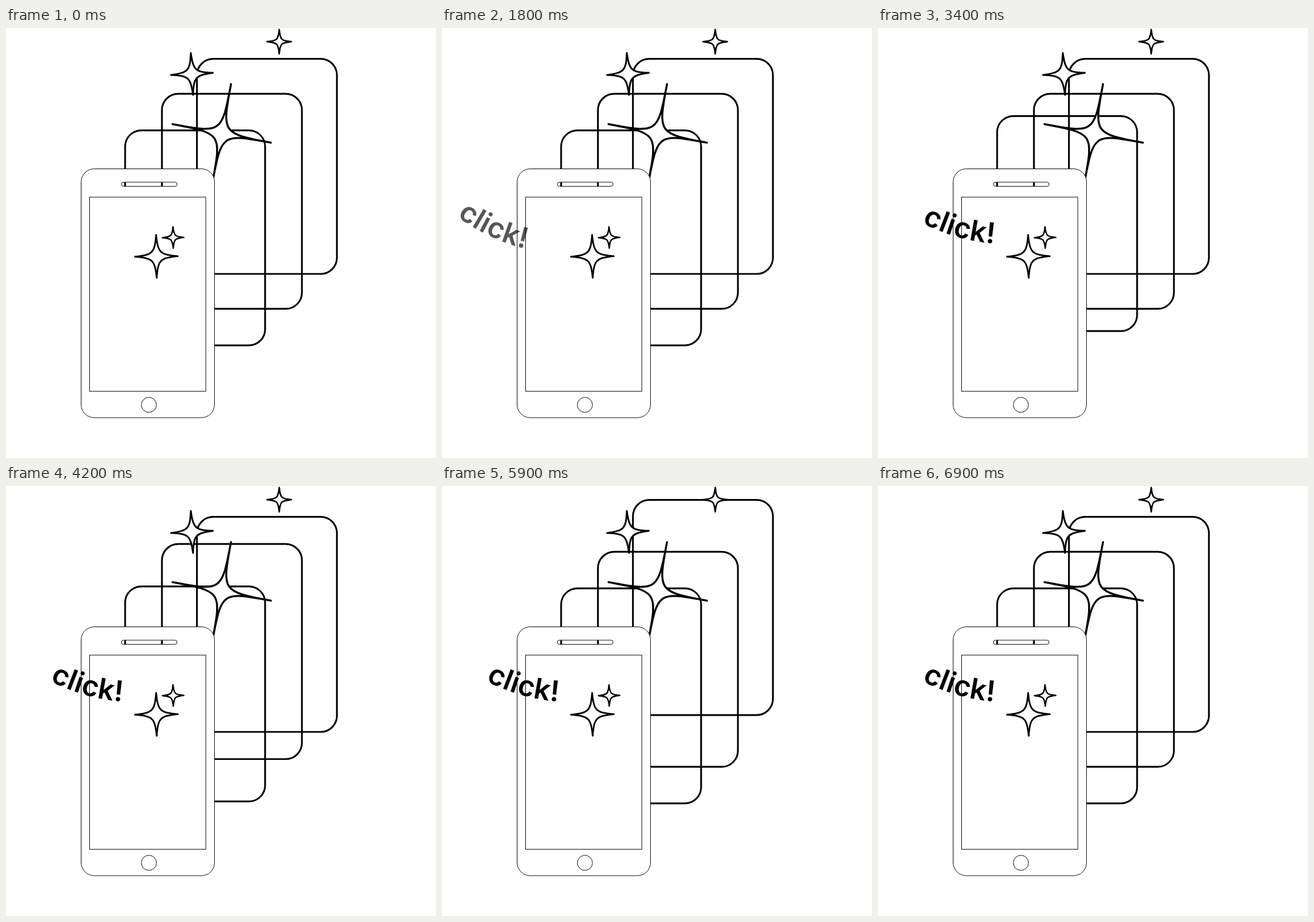
These frames come from a looping animation (661x661 px, 8000 ms). An HTML page with a canvas:

```html
<!DOCTYPE html>
<html lang="en">
<head>
<meta charset="utf-8">
<title>Click</title>
<style>
  html, body { margin: 0; width: 100%; height: 100%; overflow: hidden; background: #fff; }
  canvas { display: block; }
</style>
</head>
<body>
<canvas id="stage" width="661" height="661"></canvas>
<script>
const ctx = document.getElementById('stage').getContext('2d');
const LOOP = 8000, STEP = 100, INK = '#000';

// Each card hops up once: rise from start to peak, settle at end.
const cards = [
  { x: 293.5, y: 47.4, lift: 28, start: 5427, peak: 6000, end: 6909 },
  { x: 239.7, y: 101.1, lift: 37.5, start: 3900, peak: 4686, end: 5681 },
  { x: 183.1, y: 157.3, lift: 25, start: 2898, peak: 3546, end: 4390 }
];

// c1, c2: curve controls as a share of the radius.
const bigStar = { x: 331.6, y: 162, r: 77, turn: 10.7, c1: 0, c2: 0, w: 3 };
const stars = [
  { x: 285.8, y: 70.6, r: 32.3, turn: -3, c1: 0.08, c2: 0.16, w: 2.6 },
  { x: 420, y: 21, r: 18.6, turn: 0, c1: 0.08, c2: 0.16, w: 2.4 }
];
const screenStars = [
  { x: 231.2, y: 351.1, r: 33, turn: -0.8, c1: 0.08, c2: 0.16, w: 2.5 },
  { x: 256.9, y: 322.1, r: 16.4, turn: -0.8, c1: 0.08, c2: 0.16, w: 2.2 }
];

const rad = deg => deg * Math.PI / 180;

function hop(c, t) {
  if (t <= c.start || t >= c.end) return 0;
  const span = t < c.peak ? c.peak - c.start : c.end - c.peak;
  return c.lift * Math.cos((t - c.peak) / span * Math.PI / 2) ** 2;
}

function drawCard(c, t) {
  ctx.beginPath();
  ctx.roundRect(c.x, c.y - hop(c, t), 215.2, 330.6, 25);
  ctx.lineWidth = 2.7;
  ctx.strokeStyle = INK;
  ctx.stroke();
}

function drawStar(s) {
  ctx.save();
  ctx.translate(s.x, s.y);
  ctx.rotate(rad(s.turn));
  const a = s.c1 * s.r, b = s.c2 * s.r;
  ctx.beginPath();
  ctx.moveTo(0, -s.r);
  for (let i = 0; i < 4; i++) {
    ctx.bezierCurveTo(a, -b, b, -a, s.r, 0);
    ctx.rotate(Math.PI / 2);
  }
  ctx.closePath();
  ctx.fillStyle = '#fff';
  ctx.fill();
  ctx.lineWidth = s.w;
  ctx.lineJoin = 'round';
  ctx.strokeStyle = INK;
  ctx.stroke();
  ctx.restore();
}

function drawPhone() {
  ctx.strokeStyle = '#222';
  ctx.lineWidth = 1;
  // The speaker slot is an opening through the body.
  ctx.beginPath();
  ctx.roundRect(115.5, 216.5, 205, 382.5, 20);
  ctx.roundRect(177.3, 237, 85.7, 6.4, 3.2);
  ctx.fillStyle = '#fff';
  ctx.fill('evenodd');
  ctx.stroke();
  ctx.strokeRect(128.5, 260, 178.6, 298.4);
  ctx.beginPath();
  ctx.arc(219.7, 579.3, 11.6, 0, Math.PI * 2);
  ctx.stroke();
}

// Word set on the inside of a shallow arc.
function drawWord(t) {
  if (t < 1400) return;
  const left = Math.max(0, 1 - (t - 1300) / 1900);
  const shift = -75 * left ** 1.6;
  const cx = 123.7, cy = 305.5, R = 290, gap = 0.6;
  ctx.save();
  ctx.globalAlpha = Math.min(1, (t - 1300) / 760);
  ctx.fillStyle = INK;
  ctx.font = '600 44px Inter, "Open Sans", sans-serif';
  ctx.textAlign = 'center';
  ctx.translate(cx + shift, cy + shift * 0.02);
  ctx.rotate(rad(-shift * 0.204));
  ctx.translate(-cx, -cy);

  const word = [...'click!'];
  const widths = word.map(ch => ctx.measureText(ch).width + gap);
  const total = widths.reduce((a, b) => a + b, 0);
  const mid = rad(16);
  const ox = 121.5 + R * Math.sin(mid), oy = 321 - R * Math.cos(mid);
  let s = -total / 2;
  word.forEach((ch, i) => {
    const a = mid - (s + widths[i] / 2) / R;
    ctx.save();
    ctx.translate(ox - R * Math.sin(a), oy + R * Math.cos(a));
    ctx.rotate(a);
    ctx.fillText(ch, 0, 0);
    ctx.restore();
    s += widths[i];
  });
  ctx.restore();
}

function draw(t) {
  ctx.fillStyle = '#fff';
  ctx.fillRect(0, 0, 661, 661);
  cards.forEach(c => drawCard(c, t));
  drawStar(bigStar);
  stars.forEach(drawStar);
  drawPhone();
  screenStars.forEach(drawStar);
  drawWord(t);
}

const begin = performance.now();
function tick() {
  const t = (performance.now() - begin) % LOOP;
  draw(Math.floor(t / STEP) * STEP);
  requestAnimationFrame(tick);
}
tick();
</script>
</body>
</html>
```
